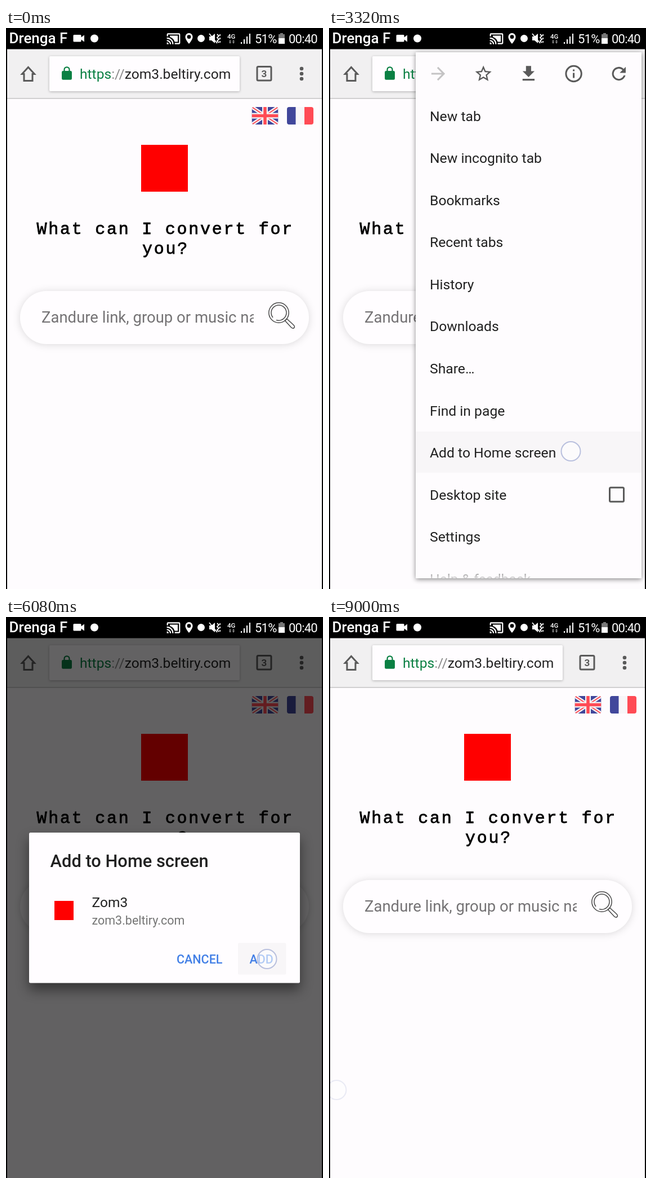
Animation, 563 px wide and 994 px high, one loop 9040 ms. Source, as an HTML page:

```html
<!DOCTYPE html>
<html lang="en">
<head>
<meta charset="utf-8">
<style>
  html, body { margin: 0; width: 100%; height: 100%; overflow: hidden; background: #000; }
  svg { display: block; width: 563px; height: 994px; font-family: Roboto, "Noto Sans", sans-serif; }
  text { white-space: pre; }
  .status { fill: #fff; font-size: 22px; letter-spacing: -.8px; }
  .heading { font: 30px "Liberation Mono", monospace; letter-spacing: 2.75px; stroke: #000; stroke-width: .8px; }
  .card { filter: drop-shadow(0 2px 4px #0007); }
  .action { font-size: 21.5px; font-weight: 500; fill: #427fe6; }
</style>
</head>
<body>
<svg viewBox="0 0 563 994">
  <defs>
    <clipPath id="fieldClip"><rect x="60" y="480" width="380" height="70"/></clipPath>
    <clipPath id="menuClip"><rect x="154" y="43" width="401" height="932"/></clipPath>
    <clipPath id="flagClip"><rect width="47" height="31" rx="4"/></clipPath>
    <linearGradient id="edge" x2="0" y2="1">
      <stop offset="0" stop-color="#fefcfe" stop-opacity="0"/>
      <stop offset="1" stop-color="#fefcfe"/>
    </linearGradient>
  </defs>

  <!-- Page -->
  <rect y="37" width="563" height="957" fill="#fefcfe"/>
  <g transform="translate(436.5 140)" clip-path="url(#flagClip)">
    <rect width="47" height="31" fill="#41479b"/>
    <path d="M0 0L47 31M47 0L0 31" stroke="#f5f5f5" stroke-width="6.5"/>
    <path d="M0 0L47 31M47 0L0 31" stroke="#ff4b55" stroke-width="2"/>
    <path d="M23.5 0V31M0 15.5H47" stroke="#f5f5f5" stroke-width="10"/>
    <path d="M23.5 0V31M0 15.5H47" stroke="#ff4b55" stroke-width="5.6"/>
  </g>
  <g transform="translate(499 140)" clip-path="url(#flagClip)">
    <rect width="47" height="31" fill="#f8f6f8"/>
    <rect width="15.5" height="31" fill="#41479b"/>
    <rect x="31" width="16" height="31" fill="#ff4b55"/>
  </g>
  <rect x="240" y="207" width="83" height="83" fill="#f00"/>
  <text class="heading" x="54.500" y="365">What can I convert for</text>
  <text class="heading" x="242" y="400">you?</text>
  <rect x="25" y="466" width="513" height="94" rx="47" fill="#fffdff" style="filter:drop-shadow(0 1px 7px #00000024)"/>
  <g clip-path="url(#fieldClip)">
    <text x="63" y="522" font-size="27.5" fill="#757375">Zandure link, group or music name</text>
  </g>
  <g fill="none" stroke="#4a4a4a" stroke-width="1.5">
    <circle cx="484.500" cy="504.500" r="17.700"/>
    <path d="M474 513A13.500 13.500 0 1 1 495 513A13.500 13.500 0 0 1 480 517.500"/>
    <path d="M495.500 518.500L499 515.500L511 526.500Q513.500 529.500 511.500 531.500Q509 533 506.500 530.500Z"/>
  </g>

  <!-- Browser bar -->
  <rect y="37" width="563" height="87" fill="#f1f0f1"/>
  <rect y="124" width="563" height="1.500" fill="#c4c3c4"/>
  <rect x="77" y="50" width="338" height="62" rx="2" fill="#fffdff" style="filter:drop-shadow(0 1px 2px #0004)"/>
  <path d="M28.500 81.500L39.500 69.500L50.500 81.500H47V93.500H32V81.500Z" fill="none" stroke="#5a5a5a" stroke-width="3"/>
  <g id="lock"></g>
  <text x="131" y="89.500" font-size="24.600" fill="#222"><tspan fill="#0b8043">https</tspan><tspan fill="#888">://</tspan>zom3.beltiry.com</text>
  <rect x="446" y="68.500" width="25" height="24.500" rx="2" fill="none" stroke="#5a5a5a" stroke-width="3"/>
  <text x="458.500" y="87" font-size="17" font-weight="700" text-anchor="middle" fill="#5a5a5a">3</text>
  <g fill="#5a5a5a"><circle cx="525" cy="72" r="3.300"/><circle cx="525" cy="81" r="3.300"/><circle cx="525" cy="90" r="3.300"/></g>

  <!-- Overflow menu -->
  <g id="menu">
    <rect class="card" x="154" y="43" width="401" height="932" rx="1" fill="#fefcfe"/>
    <g clip-path="url(#menuClip)">
      <rect id="rowPress" x="154" y="715" width="401" height="73" fill="#f8f6f8"/>
      <g id="tools"></g>
      <g id="rows" font-size="24.700" fill="#212121"></g>
      <rect x="154" y="945" width="401" height="36" fill="url(#edge)"/>
      <rect id="scrollbar" x="548.500" y="43" width="6.500" height="897" fill="#b5b4b5"/>
    </g>
  </g>

  <!-- Dialog -->
  <rect id="scrim" y="37" width="563" height="957"/>
  <g id="dialog">
    <rect x="41" y="382" width="481" height="266.500" rx="2.500" fill="#fffdff" style="filter:drop-shadow(0 12px 11px #0007)"/>
    <text x="78.500" y="443" font-size="30.800" font-weight="500" fill="#212121">Add to Home screen</text>
    <rect x="86" y="503" width="34" height="34" fill="#f00"/>
    <text x="152.500" y="514" font-size="24.500" fill="#212121">Zom3</text>
    <text x="152.500" y="545" font-size="21.500" fill="#757575">zom3.beltiry.com</text>
    <rect id="addPress" x="412" y="577.500" width="85.500" height="56" rx="2" fill="#f8f6f8"/>
    <text class="action" x="303" y="613.500">CANCEL</text>
    <text class="action" x="432.500" y="613.500">ADD</text>
  </g>

  <circle id="dot" r="17" fill="#fff" fill-opacity=".6" stroke="#b9c0de" stroke-width="2"/>

  <!-- Status bar and screen edges -->
  <path d="M0 0H563V994H561V37.500H2V994H0Z"/>
  <text x="5.500" y="27" font-size="26" font-weight="500" fill="#fff">Drenga F</text>
  <g id="statusIcons" fill="#fff">
    <path d="M121 12H132Q133.500 12 133.500 13.500V16.500L139 12.500V24.500L133.500 20.500V23Q133.500 24.500 132 24.500H121Q119.500 24.500 119.500 23V13.500Q119.500 12 121 12Z"/>
    <circle cx="157" cy="18.500" r="7"/>
    <circle cx="346.500" cy="18.500" r="6.500"/>
    <path d="M361 15H365L371 10V27L365 22H361Z"/>
    <path d="M361 10L375 27M375 11L378 14L375 17L378 20L375 23L378 26M380 11V14M380 17V20M380 23V26" fill="none" stroke="#fff" stroke-width="1.800"/>
    <text x="393" y="19" font-size="11.500" font-weight="500">4G</text>
    <path d="M396 24L398 21.500L400 24ZM396 25H400L398 27.500ZM402 24L404 21.500L406 24ZM402 25H406L404 27.500Z" fill="#b5b5b5"/>
    <path d="M417 25H419V28H417ZM422 20H424V28H422ZM427 15H429V28H427ZM432 10H434V28H432Z"/>
    <path d="M487 9H492V11H495V18H484V11H487Z" fill="#777"/>
    <rect x="484" y="18" width="11" height="10"/>
  </g>
  <text class="status" x="442" y="27">51%</text>
  <text class="status" x="502" y="27">00:40</text>
</svg>

<script>
const LOOP = 9040, ROW_STEP = 74.55, SLIDE = 16;
const $ = id => document.getElementById(id);
const ramp = (t, a, b) => Math.min(1, Math.max(0, (t - a) / (b - a)));
const easeOut = (p, power = 2) => 1 - (1 - p) ** power;

// Icon shapes on a 24-unit grid
const shapes = {
  forward: "M12 4l-1.41 1.41L16.17 11H4v2h12.17l-5.58 5.59L12 20l8-8z",
  star: "M22 9.24l-7.19-.62L12 2 9.19 8.63 2 9.24l5.46 4.73L5.82 21 12 17.27 18.18 21l-1.63-7.03zM12 15.4l-3.76 2.27 1-4.28-3.32-2.88 4.38-.38L12 6.1l1.71 4.04 4.38.38-3.32 2.88 1 4.28z",
  download: "M19 9h-4V3H9v6H5l7 7 7-7zM5 18v2h14v-2z",
  info: "M11 17h2v-6h-2zM11 9h2V7h-2zM12 2a10 10 0 1 0 0 20a10 10 0 1 0 0-20zM12 4a8 8 0 1 1 0 16a8 8 0 1 1 0-16z",
  refresh: "M17.65 6.35A8 8 0 1 0 19.73 14h-2.08A6 6 0 1 1 16.22 7.78L13 11h7V4z",
  lock: "M18 8h-1V6a5 5 0 0 0-10 0v2H6a2 2 0 0 0-2 2v10a2 2 0 0 0 2 2h12a2 2 0 0 0 2-2V10a2 2 0 0 0-2-2zM9 6a3 3 0 0 1 6 0v2H9z",
  cast: "M21 3H3a2 2 0 0 0-2 2v3h2V5h18v14h-7v2h7a2 2 0 0 0 2-2V5a2 2 0 0 0-2-2zM1 18v3h3a3 3 0 0 0-3-3zM1 14v2a5 5 0 0 1 5 5h2a7 7 0 0 0-7-7zM1 10v2a9 9 0 0 1 9 9h2a11 11 0 0 0-11-11zM6 7h13v10h-5A13 13 0 0 0 6 9z",
  place: "M12 2a7 7 0 0 0-7 7c0 5.25 7 13 7 13s7-7.75 7-13a7 7 0 0 0-7-7zM12 12.600a3.600 3.600 0 0 1 0-7.200a3.600 3.600 0 0 1 0 7.200z"
};
const icon = (name, x, y, scale, fill) =>
  `<path d="${shapes[name]}" fill="${fill}" fill-rule="evenodd" transform="translate(${x} ${y}) scale(${scale}) translate(-12 -12)"/>`;

const add = (id, markup) => $(id).insertAdjacentHTML("beforeend", markup);
add("lock", icon("lock", 108, 80.5, 1.12, "#0b8043"));
add("statusIcons", icon("cast", 297.5, 19, 1.08, "#fff") + icon("place", 325, 18.5, .94, "#fff"));

["forward", "star", "download", "info", "refresh"].forEach((name, i) => add("tools",
  `<g>${icon(name, 194 + i * 80.2, 81, i === 1 ? 1.45 : 1.52, i ? "#5a5a5a" : "#c4c3c4")}</g>`));

["New tab", "New incognito tab", "Bookmarks", "Recent tabs", "History", "Downloads", "Share…",
 "Find in page", "Add to Home screen", "Desktop site", "Settings", "Help &amp; feedback"].forEach((label, i) => {
  const y = 164.7 + i * ROW_STEP;
  const box = i === 9 ? `<rect x="498.500" y="${y - 21.5}" width="25" height="25" rx="2" fill="none" stroke="#5a5a5a" stroke-width="3"/>` : "";
  add("rows", `<g><text x="179" y="${y}">${label}</text>${box}</g>`);
});

// Touches: x, y, press time, release time
const taps = [
  [525, 81, 1120, 1380],
  [429.5, 750, 3220, 3400],
  [463.5, 606, 5980, 6150],
  [13.5, 838, 8790, 8860]
];

function show(el, opacity, transform) {
  el.setAttribute("opacity", opacity);
  el.setAttribute("visibility", opacity > 0 ? "visible" : "hidden");
  if (transform) el.setAttribute("transform", transform);
}

// Menu parts fade and slide in one after another
function enter(el, t, order, axis) {
  const start = 1450 + 30 * order;
  const p = easeOut(ramp(t, start, start + 350));
  const shift = SLIDE * (1 - p);
  el.setAttribute("opacity", p);
  el.setAttribute("transform", axis === "x" ? `translate(${shift} 0)` : `translate(0 ${-shift})`);
}

function draw(t) {
  const grow = .85 + .15 * easeOut(ramp(t, 1370, 1570));
  show($("menu"), ramp(t, 1370, 1500) * (1 - ramp(t, 3480, 3680)),
    `translate(555 43) scale(${grow}) translate(-555 -43)`);
  [...$("tools").children].forEach((el, i) => enter(el, t, i + 1, "x"));
  [...$("rows").children].forEach((el, i) => enter(el, t, i + 1, "y"));
  $("scrollbar").setAttribute("opacity", 1 - ramp(t, 2000, 2250));
  $("rowPress").setAttribute("opacity", ramp(t, 3230, 3300));

  const open = ramp(t, 4360, 4640), close = ramp(t, 6420, 6680);
  show($("scrim"), .61 * open * (1 - close));
  show($("dialog"), ramp(t, 4360, 4500) * (1 - ramp(t, 6420, 6600)),
    `translate(0 ${46 * (1 - easeOut(open, 3))})`);
  $("addPress").setAttribute("opacity", ramp(t, 5990, 6060));

  const tap = taps.find(([, , down, up]) => t >= down && t < up + 200);
  show($("dot"), tap ? 1 - ramp(t, tap[3], tap[3] + 200) : 0, tap && `translate(${tap[0]} ${tap[1]})`);
}

const begin = performance.now();
function tick() {
  draw((performance.now() - begin) % LOOP);
  requestAnimationFrame(tick);
}
tick();
</script>
</body>
</html>
```
